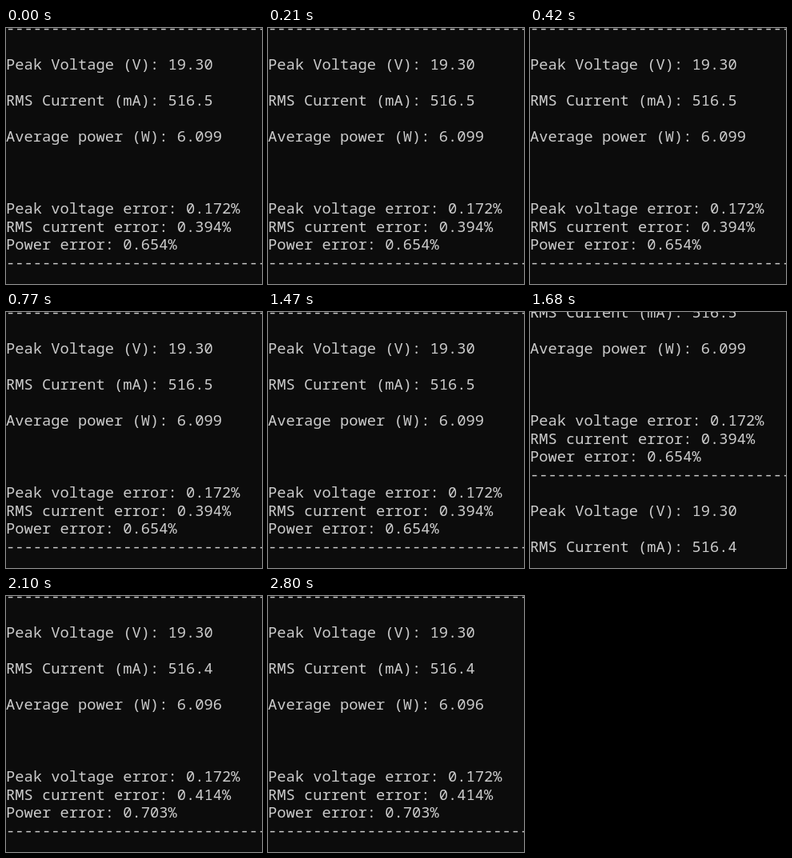
Animation, 320 px wide and 320 px high, one loop 2.87 s. Source, as an HTML page with a canvas:

```html
<!DOCTYPE html>
<html lang="en">
<head>
<meta charset="utf-8">
<title>Power readings</title>
<style>
  html, body { margin: 0; height: 100%; overflow: hidden; background: #0c0c0c; }
  canvas { display: block; }
</style>
</head>
<body>
<canvas width="320" height="320"></canvas>
<script>
const ctx = document.querySelector('canvas').getContext('2d');
const LOOP = 2870, ROWS = 14, LINE = 22.5, BASELINE = 7;
const RULE = '-'.repeat(29);

const report = (current, power, currentError, powerError) => [
  '', 'Peak Voltage (V): 19.30',
  '', `RMS Current (mA): ${current}`,
  '', `Average power (W): ${power}`,
  '', '', '', 'Peak voltage error: 0.172%',
  `RMS current error: ${currentError}%`,
  `Power error: ${powerError}%`,
  RULE
];

const first = report('516.5', '6.099', '0.394', '0.654');
const last = report('516.4', '6.096', '0.414', '0.703');
const log = [RULE, ...first, ...first, ...last];

// [start time in ms, first visible line of the log]
const scrolls = [[0, 0], [350, 4], [420, 13], [1680, 17], [1750, 26]];

function draw(now) {
  const t = now % LOOP;
  const top = scrolls.findLast(([start]) => t >= start)[1];
  ctx.fillStyle = '#0c0c0c';
  ctx.fillRect(0, 0, 320, 320);
  ctx.fillStyle = '#cccccc';
  ctx.font = '18.75px "Noto Sans Mono", "DejaVu Sans Mono", monospace';
  log.slice(top, top + ROWS).forEach((text, row) =>
    ctx.fillText(text, 0, BASELINE + row * LINE));
}

const begin = performance.now();
function tick() {
  draw(performance.now() - begin);
  requestAnimationFrame(tick);
}
tick();
</script>
</body>
</html>
```
